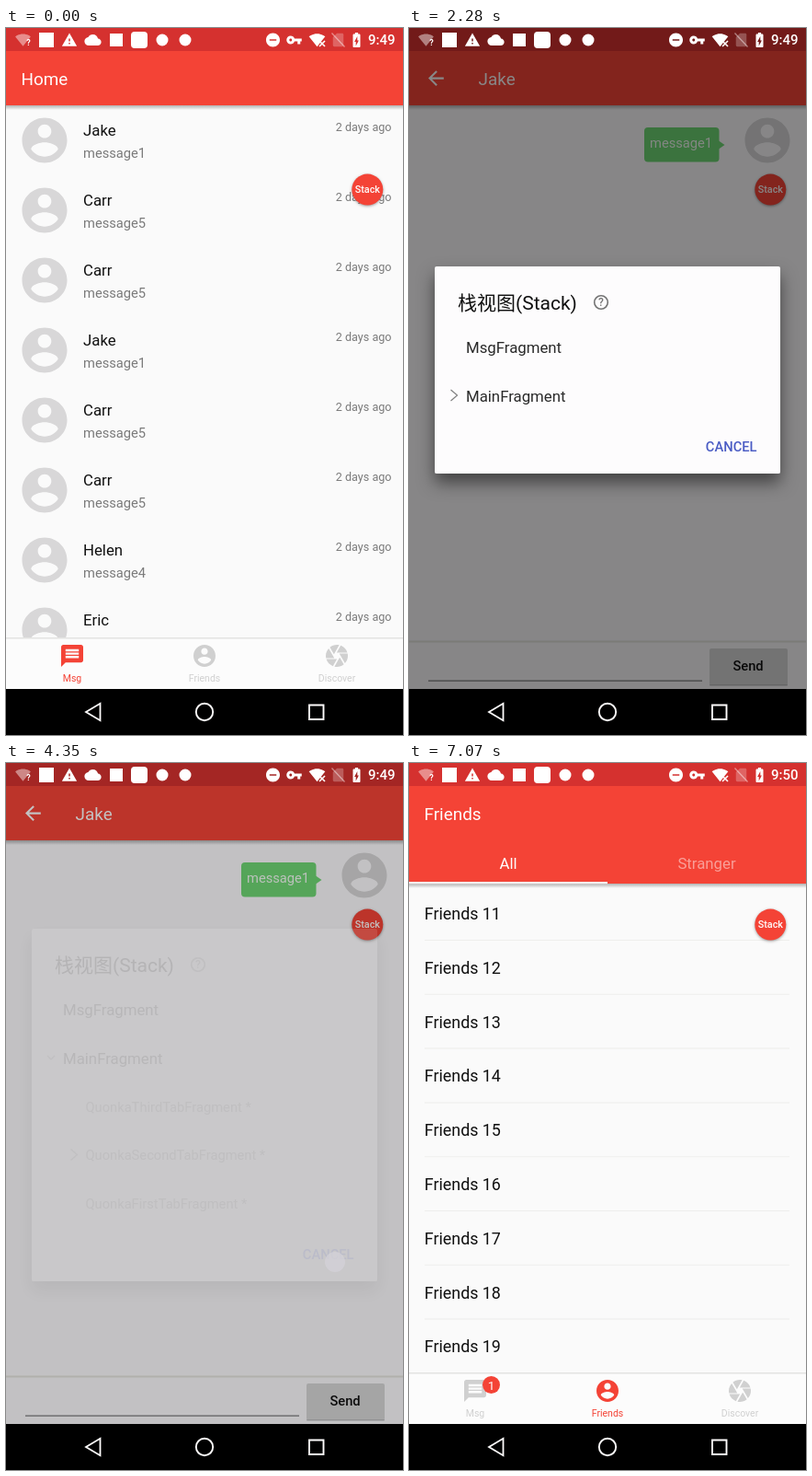
An HTML page with a canvas for the animation above (8000 ms loop, 432 by 768 pixels).

```html
<!DOCTYPE html>
<html lang="en">
<head>
<meta charset="utf-8">
<title>Messenger demo</title>
<style>
html, body { margin: 0; width: 100%; height: 100%; overflow: hidden; background: #000; }
canvas { display: block; width: 432px; height: 768px; }
</style>
</head>
<body>
<canvas id="stage" width="432" height="768"></canvas>
<script>
const ctx = document.getElementById('stage').getContext('2d');
const W = 432, BOTTOM = 718, LOOP = 8000;
const RED = '#f44336', WHITE = '#fefcfc', LIST_BG = '#fafafa', PAGE_BG = '#fcfbfd', MUTED = '#d0d0d0',
  AVATAR = '#d8d7d8', INK = '#101010', GRAY = '#7a7a7a', KEY = '#39474e', KEY_SOFT = '#7c868b';
const FONT = 'Roboto, "Noto Sans CJK SC", "Noto Sans CJK", sans-serif';

const icons = {
  account: 'M12 2C6.48 2 2 6.48 2 12s4.48 10 10 10 10-4.48 10-10S17.52 2 12 2zm0 3c1.66 0 3 1.34 3 3s-1.34 3-3 3-3-1.34-3-3 1.34-3 3-3zm0 14.2c-2.5 0-4.71-1.28-6-3.22.03-1.99 4-3.08 6-3.08 1.99 0 5.97 1.09 6 3.08-1.29 1.94-3.5 3.22-6 3.22z',
  chat: 'M20 2H4c-1.1 0-1.99.9-1.99 2L2 22l4-4h14c1.1 0 2-.9 2-2V4c0-1.1-.9-2-2-2zm-2 12H6v-2h12v2zm0-3H6V9h12v2zm0-3H6V6h12v2z',
  shutter: 'M9.4 10.5l4.77-8.26C13.47 2.09 12.75 2 12 2c-2.4 0-4.6.85-6.32 2.25l3.66 6.35.06-.1zM21.54 9c-.92-2.92-3.15-5.26-6-6.34L11.88 9h9.66zm.26 1h-7.49l.29.5 4.76 8.25C21 16.97 22 14.61 22 12c0-.69-.07-1.35-.2-2zM8.54 12l-3.9-6.75C3.01 7.03 2 9.39 2 12c0 .69.07 1.35.2 2h7.49l-1.15-2zm-6.08 3c.92 2.92 3.15 5.26 6 6.34L12.12 15H2.46zm11.27 0l-3.9 6.76c.7.15 1.42.24 2.17.24 2.4 0 4.6-.85 6.32-2.25l-3.66-6.35-.93 1.6z',
  back: 'M20 11H7.83l5.59-5.59L12 4l-8 8 8 8 1.41-1.41L7.83 13H20v-2z',
  cloud: 'M19.35 10.04C18.67 6.59 15.64 4 12 4 9.11 4 6.6 5.64 5.35 8.04 2.34 8.36 0 10.91 0 14c0 3.31 2.69 6 6 6h13c2.76 0 5-2.24 5-5 0-2.64-2.05-4.78-4.65-4.96z',
  warning: 'M1 21h22L12 2 1 21zm12-3h-2v-2h2v2zm0-4h-2v-4h2v4z',
  quiet: 'M12 2C6.48 2 2 6.48 2 12s4.48 10 10 10 10-4.48 10-10S17.52 2 12 2zm5 11H7v-2h10v2z',
  vpn: 'M12.65 10C11.83 7.67 9.61 6 7 6c-3.31 0-6 2.69-6 6s2.69 6 6 6c2.61 0 4.83-1.67 5.65-4H17v4h4v-4h2v-4H12.65zM7 14c-1.1 0-2-.9-2-2s.9-2 2-2 2 .9 2 2-.9 2-2 2z',
  wifi: 'M12 21.5L23.6 7C23.2 6.7 18.7 3 12 3S.8 6.7.4 7L12 21.5z',
  sim: 'M18 2H10L4 8v12c0 1.1.9 2 2 2h12c1.1 0 2-.9 2-2V4c0-1.1-.9-2-2-2z',
  battery: 'M15.67 4H14V2h-4v2H8.33C7.6 4 7 4.6 7 5.33v15.33C7 21.4 7.6 22 8.33 22h7.33c.74 0 1.34-.6 1.34-1.33V5.33C17 4.6 16.4 4 15.67 4zM11 20v-5.5H9L13 7v5.5h2L11 20z',
  mic: 'M12 14c1.66 0 2.99-1.34 2.99-3L15 5c0-1.66-1.34-3-3-3S9 3.34 9 5v6c0 1.66 1.34 3 3 3zm5.3-3c0 3-2.54 5.1-5.3 5.1S6.7 14 6.7 11H5c0 3.41 2.72 6.23 6 6.72V21h2v-3.28c3.28-.48 6-3.3 6-6.72h-1.7z',
  erase: 'M22 3H7c-.69 0-1.23.35-1.59.88L0 12l5.41 8.11c.36.53.9.89 1.59.89h15c1.1 0 2-.9 2-2V5c0-1.1-.9-2-2-2zm-3 12.59L17.59 17 14 13.41 10.41 17 9 15.59 12.59 12 9 8.41 10.41 7 14 10.59 17.59 7 19 8.41 15.41 12 19 15.59z'
};
for (const k in icons) icons[k] = new Path2D(icons[k]);

const clamp = v => Math.max(0, Math.min(1, v));
const span = (t, a, b) => clamp((t - a) / (b - a));
const easeOut = (p, n = 2) => 1 - (1 - p) ** n;
const mix = (a, b, p) => a + (b - a) * p;

function rect(x, y, w, h, color, r = 0) {
  ctx.fillStyle = color;
  ctx.beginPath();
  ctx.roundRect(x, y, w, h, r);
  ctx.fill();
}
function disc(x, y, r, color) {
  ctx.fillStyle = color;
  ctx.beginPath();
  ctx.arc(x, y, r, 0, 7);
  ctx.fill();
}
function ring(x, y, r, color, width) {
  ctx.strokeStyle = color;
  ctx.lineWidth = width;
  ctx.beginPath();
  ctx.arc(x, y, r, 0, 7);
  ctx.stroke();
}
function line(points, color, width, close) {
  ctx.strokeStyle = color;
  ctx.lineWidth = width;
  ctx.beginPath();
  points.forEach(p => ctx.lineTo(...p));
  if (close) ctx.closePath();
  ctx.stroke();
}
function poly(points, color) {
  ctx.fillStyle = color;
  ctx.beginPath();
  points.forEach(p => ctx.lineTo(...p));
  ctx.fill();
}
function text(s, x, y, size, color, align = 'left', weight = 400) {
  ctx.font = `${weight} ${size}px ${FONT}`;
  ctx.textAlign = align;
  ctx.fillStyle = color;
  ctx.fillText(s, x, y);
}
function icon(name, x, y, scale, color) {
  ctx.save();
  ctx.translate(x - 12 * scale, y - 12 * scale);
  ctx.scale(scale, scale);
  ctx.fillStyle = color;
  ctx.fill(icons[name]);
  ctx.restore();
}
function inside(x, y, w, h, draw) {
  ctx.save();
  ctx.beginPath();
  ctx.rect(x, y, w, h);
  ctx.clip();
  draw();
  ctx.restore();
}
function toolbar(h) {
  rect(0, 25, W, h, RED);
  const g = ctx.createLinearGradient(0, 25 + h, 0, 30 + h);
  g.addColorStop(0, 'rgba(90,90,90,.45)');
  g.addColorStop(1, 'rgba(90,90,90,0)');
  ctx.fillStyle = g;
  ctx.fillRect(0, 25 + h, W, 5);
}

const chats = [['Jake', 1], ['Carr', 5], ['Carr', 5], ['Jake', 1],
  ['Carr', 5], ['Carr', 5], ['Helen', 4], ['Eric', 3]];

function chatList(t) {
  rect(0, 84, W, 580, LIST_BG);
  const press = span(t, 590, 1000);
  if (press > 0 && press < 1) inside(0, 84, W, 76, () =>
    disc(216, 122, 230 * easeOut(press), `rgba(0,0,0,${.08 * (1 - press)})`));
  chats.forEach(([name, n], i) => {
    const y = 76 * i;
    icon('account', 42, 122 + y, 2.45, AVATAR);
    text(name, 84, 117 + y, 16.8, INK);
    text('message' + n, 84, 141 + y, 14.7, GRAY);
    text('2 days ago', 419.5, 112 + y, 12.6, GRAY, 'right');
  });
  toolbar(59);
  text('Home', 16.5, 62, 18.9, WHITE);
}
function friendList() {
  rect(0, 84, W, 580, LIST_BG);
  for (let i = 0; i < 9; i++) {
    const y = 58.8 * i;
    text('Friends 1' + (i + 1), 16.8, 170 + y, 17.85, INK);
    rect(17, 192 + y, 397, 1, '#eeeeec');
  }
  toolbar(106);
  text('Friends', 16.5, 62, 18.9, WHITE);
  text('All', 108, 114.5, 16.8, WHITE, 'center');
  text('Stranger', 324, 114.5, 16.8, '#f99f98', 'center');
  rect(0, 129, 216, 2.2, '#f5f0f0');
}
function bottomBar(active, badge, t) {
  rect(0, 663, W, 55, '#fcfcfc');
  rect(0, 662, W, 1.5, '#e4e4e2');
  [['chat', 'Msg'], ['account', 'Friends'], ['shutter', 'Discover']].forEach(([name, label], i) => {
    const x = 72 + 144 * i, color = i === active ? RED : MUTED;
    icon(name, x, 682, 1.2, color);
    text(label, x, 710, 10.5, color, 'center');
  });
  if (badge) {
    disc(89.5, 675.5, 9.5, RED);
    text('1', 89.5, 680.5, 13.5, WHITE, 'center');
  }
  const p = span(t, 6600, 7060);
  if (p > 0 && p < 1) inside(144, 663, 144, 55, () =>
    disc(216, 690, 75 * easeOut(p), `rgba(0,0,0,${.1 * (1 - p)})`));
}
function home(t) {
  const friends = t >= 6680;
  friends ? friendList() : chatList(t);
  bottomBar(friends ? 1 : 0, friends, t);
}

function conversation(t) {
  const typing = t >= 4780 && t < 5600, focus = t >= 4640 && t < 5600;
  const up = typing ? 296 : 0;
  rect(0, 84, W, 634, PAGE_BG);
  toolbar(59);
  icon('back', 29.4, 54.6, 1.05, WHITE);
  text('Jake', 75.6, 62, 18.9, WHITE);
  if (t >= 1200) {
    rect(256, 108, 81.5, 37.5, '#6fd774', 4);
    poly([[337, 122.5], [343.5, 127], [337, 131.5]], '#6fd774');
    text('message1', 262, 130, 14.7, '#f4fbf4');
    icon('account', 390, 122, 2.45, AVATAR);
  }
  rect(0, 665.5 - up, W, 2, '#e6e5df');
  rect(327, 674 - up, 85, 40, '#d6d6d7', 2);
  rect(327, 713 - up, 85, 1.5, '#bdbdbf', 1);
  text('Send', 369, 698 - up, 14.7, INK, 'center', 500);
  rect(21, (focus ? 708 : 708.5) - up, 298, focus ? 2 : 1.2, focus ? '#4b57c6' : '#7b7b7d');
}

function stackButton() {
  ctx.save();
  ctx.shadowColor = 'rgba(60,60,60,.5)';
  ctx.shadowBlur = 3;
  ctx.shadowOffsetY = 1;
  disc(393.3, 175.6, 17, RED);
  ctx.restore();
  text('Stack', 393.3, 179, 10.8, WHITE, 'center', 500);
}

function dim(t) {
  const level = .6 * (span(t, 1940, 2380) - span(t, 3950, 4600));
  if (level > 0) rect(0, 0, W, BOTTOM, `rgba(0,0,0,${level})`);
}
function chevron(x, y, down) {
  line(down ? [[x - 4, y - 2], [x, y + 2], [x + 4, y - 2]] : [[x - 3.5, y - 6], [x + 3.5, y], [x - 3.5, y + 6]],
    '#808080', 1.2);
}
function dialogShadow(top, h) {
  ctx.save();
  ctx.beginPath();
  ctx.rect(0, 0, W, BOTTOM);
  ctx.rect(28, top, 376, h);
  ctx.clip('evenodd');
  ctx.shadowColor = 'rgba(0,0,0,.5)';
  ctx.shadowBlur = 18;
  ctx.shadowOffsetY = 10;
  rect(28, top, 376, h, '#fcfcfc', 2);
  ctx.restore();
}
function dialog(t) {
  const alpha = span(t, 1940, 2160) * (1 - span(t, 3950, 4400));
  if (!alpha) return;
  const open = t >= 3120;
  const top = mix(259, 180, easeOut(span(t, 3120, 3450)));
  const h = open ? 383 : 225;
  ctx.save();
  ctx.globalAlpha = alpha;
  dialogShadow(top, h);
  rect(28, top, 376, h, '#fdfcfd', 2);
  const press = span(t, 3000, 3790);
  if (press > 0 && press < 1) {
    ctx.globalAlpha = alpha * Math.min(1, press * 6, (1 - press) * 2);
    rect(28, top + 114, 270, 52.5, '#efeff0');
    inside(28, top + 114, 270, 52.5, () => disc(143, top + 140, 115 * press, '#e5e3e5'));
    ctx.globalAlpha = alpha;
  }
  text('栈视图(Stack)', 53, top + 47, 21, INK);
  ring(209, top + 39, 7.3, '#747474', 1.6);
  text('?', 209, top + 43.3, 12, '#747474', 'center', 500);
  text('MsgFragment', 62, top + 94, 16.8, '#2a2a2a');
  text('MainFragment', 62, top + 146.5, 16.8, '#2a2a2a');
  chevron(49, top + 140, open);
  if (open) {
    ['Third', 'Second', 'First'].forEach((n, i) =>
      text(`Quonka${n}TabFragment *`, 86.5, top + 198.5 + 52.5 * i, 14.7, '#757575'));
    chevron(74, top + 245.5, false);
  }
  text('CANCEL', 378.5, top + h - 24, 14.7, '#4a5cc4', 'right', 500);
  ctx.restore();
  const tap = span(t, 3820, 4350);
  if (tap > 0) disc(358, 542, 11 * tap, `rgba(212,209,216,${.8 * (1 - span(t, 4350, 4400))})`);
}

function keyRow(chars, x, y) {
  [...chars].forEach((c, i) => text(c, x + 42.75 * i, y, 25.2, KEY, 'center'));
}
function keyboard(t) {
  if (t < 4780 || t >= 5800) return;
  const enter = span(t, 4780, 5180), leave = span(t, 5600, 5800);
  ctx.save();
  ctx.beginPath();
  ctx.rect(0, 0, W, BOTTOM);
  ctx.clip();
  ctx.globalAlpha = mix(.5, 1, easeOut(enter, 3)) * (1 - leave ** 2);
  ctx.translate(0, 30 * (1 - easeOut(enter, 4) + leave ** 3));
  rect(0, 421, W, 297, '#eceff1');
  rect(0, 421, W, 47, '#e3e6e8');
  disc(7, 444, 14, '#fdfdfd');
  line([[8, 439], [13, 444], [8, 449]], '#4b4f52', 2);
  text('Suggest contact names? Tap for info.', 214.5, 451, 16.8, '#3fb0a3', 'center');
  icon('mic', 411, 445, .95, KEY_SOFT);
  keyRow('qwertyuiop', 23.5, 507);
  [...'1234567890'].forEach((c, i) => text(c, 38.5 + 42.6 * i, 486, 11, '#636c71', 'center'));
  keyRow('asdfghjkl', 44.5, 568.5);
  keyRow('zxcvbnm', 87, 630);
  poly([[34, 611], [46, 624], [39.5, 624], [39.5, 632], [28.5, 632], [28.5, 624], [22, 624]], KEY_SOFT);
  rect(28.5, 638, 11, 2, KEY_SOFT);
  icon('erase', 397.5, 622, 1.03, KEY_SOFT);
  text('?123', 34, 689.5, 18.5, '#59646a', 'center');
  ring(87.5, 673.5, 5.2, '#636c71', 1);
  disc(85.7, 672, .8, '#636c71');
  disc(89.3, 672, .8, '#636c71');
  line([[84.8, 675], [87.5, 676.8], [90.2, 675]], '#636c71', 1);
  text(',', 87, 691, 22, KEY, 'center');
  ring(129.5, 682.5, 9.6, '#636c71', 1.7);
  ctx.beginPath();
  ctx.ellipse(129.5, 682.5, 4.2, 9.6, 0, 0, 7);
  ctx.stroke();
  [-3.6, 3.6].forEach(d => line([[121, 682.5 + d], [138, 682.5 + d]], '#636c71', 1.5));
  rect(161.5, 667.5, 151.5, 30, '#cfd2d5', 3);
  text('.', 344, 690.5, 22, KEY, 'center');
  disc(397.5, 683, 18.3, '#45b2a6');
  line([[389, 683.5], [395, 689.5], [406.5, 677.5]], '#f5fbfa', 2.2);
  ctx.restore();
}

function statusIcons(t) {
  const c = '#fff', faint = 'rgba(255,255,255,.45)';
  icon('wifi', 18.5, 13, .72, faint);
  text('?', 24.5, 19, 9, c, 'center', 700);
  rect(36, 5, 16, 16, c);
  icon('warning', 69, 13, .74, c);
  icon('cloud', 94.5, 13, .76, c);
  rect(113, 6, 14, 14, c);
  rect(136, 4, 18, 18, c, 4);
  disc(170, 13, 6.5, c);
  disc(195, 13, 6.5, c);
  icon('quiet', 290.5, 13, .75, c);
  icon('vpn', 313.5, 13, .75, c);
  icon('wifi', 338.5, 13, .76, c);
  line([[341, 14], [347, 20]], c, 1.6);
  line([[347, 14], [341, 20]], c, 1.6);
  icon('sim', 361.5, 13, .72, 'rgba(255,255,255,.25)');
  line([[354.5, 5.5], [368.5, 20.5]], faint, 1.3);
  icon('battery', 381.5, 13, .8, c);
  text(t < 4640 ? '9:49' : '9:50', 394, 18, 15, c, 'left', 500);
}
function navBar(t) {
  const typing = t >= 4780 && t < 5600;
  rect(0, BOTTOM, W, 50, '#000');
  line(typing ? [[86, 735], [104, 735], [95, 750.5]] : [[87, 743], [102.5, 733.8], [102.5, 752.2]], WHITE, 1.8, true);
  ring(216, 743, 9.2, WHITE, 1.9);
  line([[330, 735.5], [345.5, 735.5], [345.5, 751], [330, 751]], WHITE, 1.9, true);
  if (!typing) return;
  rect(390, 736, 21.5, 14, WHITE, 2);
  for (let row = 0; row < 2; row++)
    for (let i = 0; i < 5; i++) rect(392.5 + 3.6 * i, 738.5 + 3.5 * row, 2, 2, '#000');
  rect(396, 746, 9.5, 2, '#000');
}

function draw(t) {
  ctx.globalAlpha = 1;
  rect(0, 0, W, 768, PAGE_BG);
  const p = easeOut(span(t, 690, 1130)) - easeOut(span(t, 5620, 6060));
  if (p < 1) {
    ctx.save();
    ctx.translate(-112 * p, 0);
    home(t);
    ctx.restore();
    rect(320, 25, 112 * p, 59, RED);
  }
  if (p > 0) inside(W * (1 - p), 25, W, 693, () => {
    ctx.translate(W * (1 - p), 0);
    conversation(t);
  });
  rect(0, 0, W, 25, '#d5312f');
  stackButton();
  dim(t);
  dialog(t);
  keyboard(t);
  statusIcons(t);
  navBar(t);
}

const start = performance.now();
function tick() {
  draw((performance.now() - start) % LOOP);
  requestAnimationFrame(tick);
}
tick();
</script>
</body>
</html>
```
